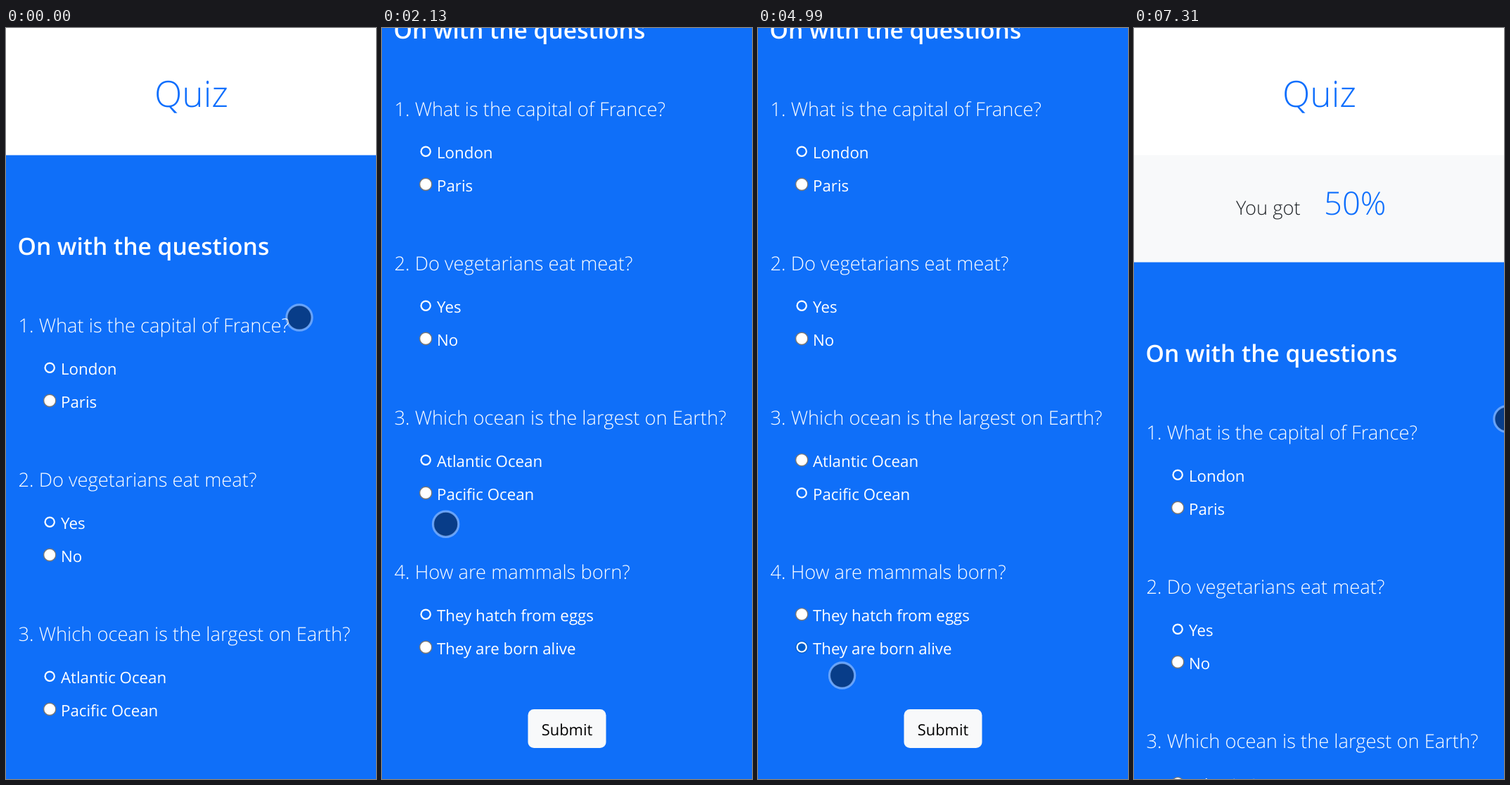
Write an HTML page that moves like this. It is 526x1066 px and loops after 8.8 s.

```html
<!DOCTYPE html>
<html lang="en">
<head>
<meta charset="utf-8">
<title>Quiz</title>
<style>
  html, body { margin: 0; width: 100%; height: 100%; overflow: hidden; background: #fff; }
  svg { display: block; width: 100%; height: 100%; }
  text { font-family: "Open Sans", "Noto Sans", sans-serif; white-space: pre; text-rendering: geometricPrecision; }
  .title { font-size: 51.4px; font-weight: 300; fill: #0d6efd; text-anchor: middle; }
  .lead { font-size: 27.3px; font-weight: 320; }
  .score { font-size: 45.4px; font-weight: 300; fill: #0d6efd; }
  .head { font-size: 33.6px; font-weight: 600; fill: #fff; }
  .option { font-size: 22.3px; fill: #fff; }
  .submit { font-size: 21.9px; text-anchor: middle; }
</style>
</head>
<body>
<svg viewBox="0 0 526 1066">
  <g id="page">
    <rect width="526" height="181" fill="#fff"/>
    <text class="title" x="263.5" y="112">Quiz</text>
    <g id="result">
      <rect y="180.5" width="526" height="153" fill="#f8f9fa"/>
      <text class="lead" x="145" y="265" fill="#212529">You got</text>
      <text class="score" id="score" x="270" y="265">0%</text>
    </g>
    <g id="quiz">
      <rect y="180.5" width="526" height="1300" fill="#0f6ff9"/>
      <text class="head" x="16.5" y="322">On with the questions</text>
      <g id="questions"></g>
      <rect id="button" x="207.5" y="1274" width="111" height="55" rx="8.5"/>
      <text class="submit" x="263" y="1311">Submit</text>
    </g>
  </g>
  <rect id="bar" x="520" width="3" fill="#808080"/>
  <g id="pointer">
    <circle r="17" fill="#000" fill-opacity=".45"/>
    <circle r="18.1" fill="none" stroke="#fff" stroke-opacity=".36" stroke-width="3.3"/>
  </g>
</svg>
<script>
const LOOP = 8800, FRAME = 78;
const VIEW_H = 1066, PAGE_H = 1373, RESULT_H = 152;
const MAX_SCROLL = PAGE_H - VIEW_H;
const TAP_3 = 3010, TAP_4 = 4215, SUBMIT = 5810;
const BLUE = "#0f6ff9";

const $ = id => document.getElementById(id);
const clamp = (v, max = 1) => Math.max(0, Math.min(max, v));
const linear = p => p;
const inOut = p => (1 - Math.cos(Math.PI * p)) / 2;
const glide = p => 1 - (1 - p) ** 4;
const overshoot = p => 1 + 2.7 * (p - 1) ** 3 + 1.7 * (p - 1) ** 2;

// The screen only refreshes inside a scene; without a goal the pointer rests
const scenes = [
  { from: 80, to: 950, goal: [411, 40], ease: inOut },
  { from: 1030, to: 1510, goal: [205, 894], ease: inOut },
  { from: 1840, to: 2680, goal: [62.5, 657.5], ease: glide },
  { from: 2930, to: 3010 },
  { from: 3160, to: 3710, goal: [65, 879], ease: overshoot },
  { from: 4140, to: 4670, goal: [62.5, 883], ease: linear },
  { from: 4830, to: 5390, goal: [247.5, 1000], ease: inOut },
  { from: 5810, to: 6120 },
  { from: 6310, to: 6440 },
  { from: 6680, to: 6780 },
  { from: 6930, to: 7310, goal: [530, 555], ease: inOut }
];

const items = [
  ["What is the capital of France?", "London", "Paris"],
  ["Do vegetarians eat meat?", "Yes", "No"],
  ["Which ocean is the largest on Earth?", "Atlantic Ocean", "Pacific Ocean"],
  ["How are mammals born?", "They hatch from eggs", "They are born alive"]
];

function add(parent, tag, attrs, content = "") {
  const el = document.createElementNS("http://www.w3.org/2000/svg", tag);
  for (const k in attrs) el.setAttribute(k, attrs[k]);
  el.textContent = content;
  return parent.appendChild(el);
}

function makeRadio(parent, y) {
  const g = add(parent, "g", { transform: `translate(62.2 ${y})` });
  const off = add(g, "circle", { r: 8.6, fill: "#fff", stroke: "#767676", "stroke-width": 1.4 });
  const on = add(g, "g", {});
  const rim = add(on, "circle", { r: 9 });
  add(on, "circle", { r: 7.7, fill: "#fff" });
  const dot = add(on, "circle", { r: 5.5 });
  return (checked, hover) => {
    off.style.display = checked ? "none" : "";
    on.style.display = checked ? "" : "none";
    rim.style.fill = dot.style.fill = hover ? "#005cc8" : BLUE;
  };
}

const radios = items.map(([question, ...options], i) => {
  const g = add($("questions"), "g", { transform: `translate(0 ${219 * i})` });
  add(g, "text", { class: "lead", x: 17.5, y: 432, fill: "#fff" }, `${i + 1}. ${question}`);
  return options.map((label, j) => {
    add(g, "text", { class: "option", x: 78, y: 492 + 46.7 * j }, label);
    return makeRadio(g, 482.2 + 46.7 * j);
  });
});

// Pointer place and time of the latest refresh
function replay(time) {
  let t = 0, x = 417, y = 411;
  for (const { from, to, goal, ease } of scenes) {
    if (time < from) break;
    const count = Math.round((to - from) / FRAME);
    const step = (to - from) / count;
    const k = Math.min(count, Math.floor((time - from) / step + 1e-6));
    t = from + k * step;
    if (!goal) continue;
    const p = ease((k + 1) / (count + 1));
    x += (goal[0] - x) * p;
    y += (goal[1] - y) * p;
  }
  return { t, x, y };
}

const move = (id, x, y) => $(id).setAttribute("transform", `translate(${x} ${y})`);

function draw(time) {
  const { t, x, y } = replay(time);
  const done = t >= SUBMIT;
  const since = t - SUBMIT;
  const dragged = t < 950 ? clamp(411 - y, MAX_SCROLL) : MAX_SCROLL;
  const scroll = done ? 448 * (1 - inOut(clamp(since / 373))) : dragged;

  move("pointer", x, y);
  move("page", 0, -scroll);
  move("quiz", 0, done ? RESULT_H : 0);
  $("result").style.display = done ? "" : "none";
  $("score").textContent = Math.round(clamp(since * .113, 50)) + "%";

  const scale = VIEW_H / (PAGE_H + (done ? RESULT_H - 14 : 0));
  const fade = t < 80 ? 0 : done ? (6930 - t) / 300 : (1510 - t) / 240;
  $("bar").setAttribute("y", scroll * scale);
  $("bar").setAttribute("height", VIEW_H * scale);
  $("bar").style.opacity = clamp(fade) * .5;
  $("button").style.fill = done ? "#e4e5e7" : "#f8f9fa";

  radios.forEach(([first, second], i) => {
    const picked = i === 2 ? t >= TAP_3 : i === 3 && t >= TAP_4;
    const hover = i === 2 ? t < TAP_4 : !done;
    first(!picked, false);
    second(picked, hover);
  });
}

const start = performance.now();
function tick() {
  draw((performance.now() - start) % LOOP);
  requestAnimationFrame(tick);
}
tick();
</script>
</body>
</html>
```
